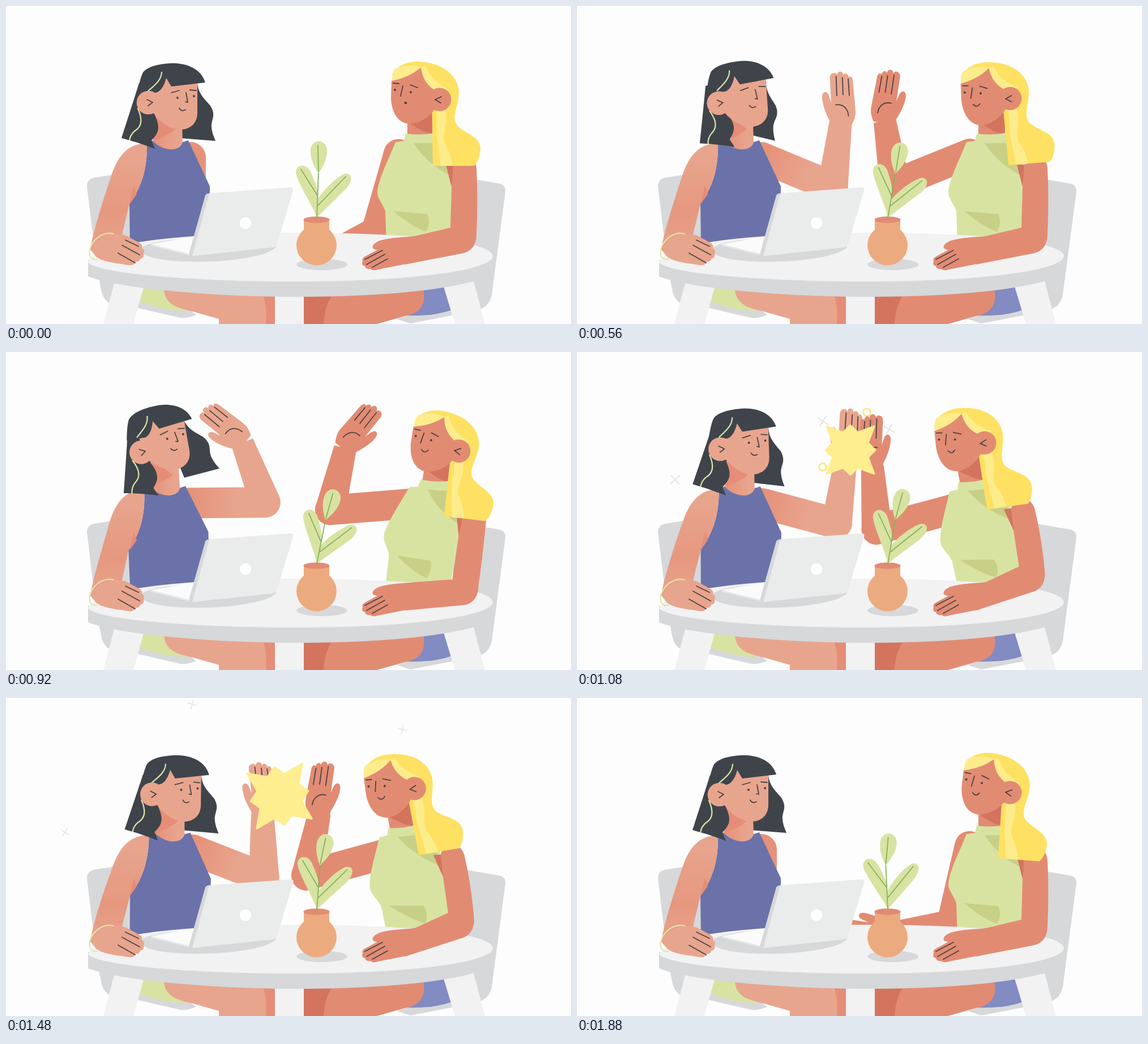
An HTML page that plays this animation: 998x561 px, repeating every 1920 ms.

```html
<!DOCTYPE html>
<html lang="en">
<head>
<meta charset="utf-8">
<title>High five</title>
<style>
html, body { margin: 0; width: 100%; height: 100%; overflow: hidden; background: #fdfdfd; }
svg { display: block; width: 100%; height: 100%; }
.ink { fill: none; stroke: #4a4444; stroke-width: 1.8; stroke-linecap: round; stroke-linejoin: round; }
.dot { fill: #4a4444; }
.grey { fill: #d6d8da; }
.pale { fill: #f2f2f2; }
.lime { fill: #d8e3a2; }
.olive { fill: #c8d088; }
.vein { fill: none; stroke: #85b35c; stroke-width: 1.8; stroke-linecap: round; }
.thread { fill: none; stroke: #dde6a9; stroke-width: 2.2; stroke-linecap: round; }
.skinA { fill: #e8a58e; }
.shadeA { fill: #e58d77; }
.skinB { fill: #e28b73; }
.shadeB { fill: #d4745f; }
.dark { fill: #3f444b; }
.gold { fill: #fee162; }
.light { fill: #fdec8c; }
.blue { fill: #6b72a9; }
</style>
</head>
<body>
<svg viewBox="0 0 998 561" preserveAspectRatio="none">
<defs>
  <linearGradient id="upper"><stop offset=".15" stop-color="#e6917a"/><stop offset=".6" stop-color="#e8a58e"/></linearGradient>
  <linearGradient id="rest" x2="0" y2="1"><stop offset=".1" stop-color="#e8a58e"/><stop offset=".6" stop-color="#e6987f"/><stop offset="1" stop-color="#e8a58e"/></linearGradient>
  <linearGradient id="neck"><stop offset="0" stop-color="#e6917a"/><stop offset=".8" stop-color="#e8a58e"/></linearGradient>
  <g id="palm">
    <path d="M-19,4 L-19,-6 C-26,-22 -30,-38 -29,-49 C-28,-60 -19,-59 -17,-50 L-14,-38 L-13,-81 C-13,-91 -1,-92 0,-85 C0,-93 11,-93 11,-84 C13,-89 20,-87 20,-80 C22,-83 27,-81 27,-73 L28,-20 C28,-8 23,-3 20,4 Z"/>
    <path class="ink" d="M-2,-83 L-3,-49 M9,-80 L8,-50 M19,-77 V-48 M-6,-33 C8,-34 15,-24 15,-12"/>
  </g>
</defs>

<g class="grey">
  <path d="M143,318 Q143,306 155,303 L225,292 L225,532 L200,530 Q172,526 168,500 L160,460 Z"/>
  <path d="M225,500 L225,531 L308,550 Q318,552 336,545 L290,510 Z"/>
  <path d="M795,300 L870,313 Q883,315 882,328 L858,510 Q854,530 835,536 L780,530 Z"/>
  <path d="M690,552 L714,560 L792,545 L780,525 Z"/>
</g>
<g id="bits"></g>

<path class="lime" d="M243,490 L236,521 Q275,537 316,538 L300,495 Z"/>
<path class="shadeA" d="M430,500 H475 V561 H440 Z"/>
<path class="skinA" d="M279,495 C278,528 305,533 330,539 L376,552 V561 H459 C461,535 458,515 449,500 Z"/>
<path class="shadeB" d="M526,500 H600 L580,561 H526 Z"/>
<path d="M730,495 H778 L788,536 Q755,548 705,546 Z" fill="#828bc2"/>
<path class="skinB" d="M580,505 C566,522 562,543 561,561 H655 L705,547 C735,541 742,525 737,495 Z"/>
<g class="pale">
  <path d="M192,485 L245,490 L225,561 H172 Z"/>
  <path d="M475,500 H526 V561 H475 Z"/>
  <path d="M770,485 L826,485 L846,561 H793 Z"/>
</g>

<g id="headBackA"><g id="lockR">
  <path class="dark" d="M300,132 L338,136 C340,155 350,163 361,176 C372,194 362,200 363,214 C364,224 367,230 370,238 L306,233 Z"/>
</g></g>

<g id="armA">
  <rect x="-27" y="-27" width="190" height="54" rx="27" fill="url(#upper)"/>
  <g id="foreA" class="skinA">
    <path d="M0,-27 L113,-20 V20 L0,27 Z"/>
    <g id="handA"><use href="#palm"/></g>
  </g>
</g>
<g id="armB" class="skinB">
  <rect x="-26" y="-26" width="196" height="53" rx="26"/>
  <g id="foreB">
    <path d="M0,-27 L113,-20 V20 L0,27 Z"/>
    <g id="handB"><use href="#palm" transform="scale(-1 1)"/></g>
  </g>
</g>

<g id="bodyA">
  <path class="blue" d="M249,241 L262,236 Q290,262 312,240 L322,237 L360,318 V425 H219 L218,348 C238,322 250,290 249,241 Z"/>
  <path d="M266,205 H311 L312,241 C306,258 278,257 259,238 Z" fill="url(#neck)"/>
  <path class="shadeA" d="M260,186 L300,217 Q290,226 262,238 Z"/>
</g>
<g id="bodyB">
  <path class="skinB" d="M709,195 H756 V232 H709 Z"/>
  <path class="shadeB" d="M712,207 L756,180 V226 L738,222 Z"/>
  <path class="lime" d="M688,240 L703,238 L706,225 Q730,229 757,224 L790,270 L787,330 L785,420 H672 L670,362 C664,345 655,340 656,325 C660,300 677,268 688,240 Z"/>
  <path class="olive" d="M720,242 H757 L786,280 V300 Q745,280 720,242 Z M684,362 L744,367 Q751,382 742,398 C722,392 700,375 684,362 Z"/>
  <path class="shadeB" d="M777,280 H796 L787,319 Z"/>
</g>

<path class="grey" d="M145,448 V477 C210,502 400,514 530,513 C700,512 825,494 853,474 L860,440 Z"/>
<path class="pale" d="M145,452 C165,476 380,487 530,486 C720,485 860,466 860,441 C858,418 740,400 503,400 C380,400 230,410 175,430 Q150,440 145,452 Z"/>

<path class="grey" d="M237,431 C246,451 330,455 400,448 C445,442 470,435 478,424 L300,412 Q240,418 237,431 Z"/>
<path d="M256,420 L340,405 L326,440 Z" fill="#fbfbfb"/>
<path d="M256,420 L324,437 V440 L256,423 Z" fill="#e6e7e8"/>
<path class="grey" d="M352,334 Q354,330 362,330 L340,440 L327,441 Q322,440 324,434 Z"/>
<path d="M358,334 Q359,330 364,330 L503,320 Q509,320 507,326 L479,419 Q477,425 471,426 L329,441 Z" fill="#eaebeb"/>
<circle cx="423" cy="383" r="10.3" fill="#fdfdfd"/>

<path id="restA" fill="url(#rest)"/>
<path class="shadeA" d="M226,317 L231,332 L218,350 Z"/>
<path class="skinA" d="M152,430 C160,410 178,402 192,402 Q208,402 216,407 L236,418 Q242,422 240,427 Q246,431 243,437 Q245,444 237,446 Q236,452 229,451 Q226,459 216,457 C198,454 172,452 160,443 Z"/>
<path class="ink" d="M211,413 L234,424 M205,422 L236,439 M198,436 L228,453"/>
<path class="thread" d="M190,402 C165,395 141,425 149,442 Q153,448 161,447"/>
<path id="restB" class="skinB"/>
<path class="skinB" d="M722,406 C705,408 680,408 660,414 C643,421 645,430 656,430 L634,442 Q628,445 630,450 Q627,458 634,459 Q635,465 644,464 Q648,468 656,465 L712,454 Z"/>
<path class="ink" d="M665,431 L634,447 M669,438 L637,456 M674,446 L647,461"/>

<ellipse class="grey" cx="558" cy="456" rx="45" ry="10"/>
<circle cx="548.5" cy="422" r="35.5" fill="#ecaa7f"/>
<path d="M526,377 H571 V400 H526 Z" fill="#ecaa7f"/>
<ellipse class="skinB" cx="548.5" cy="377" rx="23" ry="5.8"/>
<g id="plant">
  <path class="lime" d="M549,373 C542,352 511,306 512,292 C514,277 533,278 539,295 C546,310 552,322 551,340 Z"/>
  <path class="lime" d="M549,373 L550,342 C560,325 582,303 598,296 C612,294 613,308 601,322 Z"/>
  <path class="vein" d="M521,288 L550,334 M600,301 L551,352 M549,374 L552,293"/>
  <g id="leaf">
    <path class="lime" d="M552,295 C541,280 537,265 538,253 C541,234 564,234 567,253 C568,270 560,283 552,295 Z"/>
    <path class="vein" d="M552,292 L551,246"/>
  </g>
</g>

<g id="headA">
  <g id="lockL">
    <path class="dark" d="M244,136 L235,136 C226,165 214,202 204,233 Q235,241 263,252 L257,237 C270,224 273,214 263,193 L262,140 Z"/>
    <path class="thread" d="M233,181 C243,203 238,214 228,220 Q220,226 218,237"/>
  </g>
  <path class="skinA" d="M283,120 H338 V190 C337,210 322,218 308,218 C288,217 270,203 260,188 L254,150 Z"/>
  <path class="dark" d="M352,135 L292,142 L283,127 C279,144 270,154 262,153 L232,153 C235,137 238,125 242,117 C252,104 280,101 298,101 C325,102 346,114 352,135 Z"/>
  <path class="thread" d="M275,117 C274,132 262,140 251,150"/>
  <g id="earA">
    <circle class="skinA" cx="251.500" cy="170.500" r="20.800"/>
    <path class="ink" d="M249,165 L259,170 L251,176"/>
  </g>
  <path class="ink" d="M292,153 L306,149 M325,148 L336,149 M318,153 L321,170 L317,169 M306,180 Q310,187 317,183"/>
  <g id="eyesA" class="dot"><circle cx="303" cy="162" r="2"/><circle cx="332" cy="159" r="2"/></g>
</g>

<g id="headB">
  <path class="gold" d="M682,132 C682,106 708,98 726,98 C770,99 797,121 800,150 C801,175 785,195 797,211 C812,226 838,230 838,252 Q837,272 827,282 H754 L752,150 Z"/>
  <path class="light" d="M760,180 L776,184 C782,205 770,222 774,240 Q787,262 789,282 H767 C766,255 758,228 762,205 Z"/>
  <path class="skinB" d="M681,132 L733,109 C740,135 752,148 762,150 L756,184 C745,198 728,208 712,208 C688,206 680,180 680,160 Z"/>
  <path class="light" d="M682,132 Q681,118 687,111 Q710,101 733,108 Q715,125 682,132 Z M733,108 L741,106 C748,128 768,140 782,147 L762,150 C745,143 735,128 733,108 Z"/>
  <circle class="skinB" cx="766" cy="165" r="20.500"/>
  <path class="ink" d="M769,160 L758,165 L768,171 M684,136 L694,137 M714,139 L727,144 M701,141 L697,159"/>
  <g id="eyesB" class="dot"><circle cx="687" cy="148" r="2"/><circle cx="715" cy="152" r="2"/></g>
  <circle id="gasp" class="dot" cx="706" cy="171" r="2.300"/>
  <path id="smile" class="ink" d="M700,170 Q706,178 712,170"/>
</g>
<path id="star" fill="#feee90" stroke="#feee90" stroke-width="5" stroke-linejoin="round"/>
</svg>

<script>
const LOOP = 1920, STEP = 40;
const keys = [0, 280, 560, 920, 1080, 1280, 1640, 1880];
// One value per key time; angles in degrees.
const pose = {
  upperA: [90, 29, 22.5, -0.5, 15, 17, 28, 90],
  foreA:  [35, -80, -83, -111, -82, -87, -93, 35],
  handA:  [100, 0, -4, -52, 2, -8, -8, 100],
  leanA:  [0, 0, 0, -1.7, 0.6, 0.4, 1.8, 0],
  xA:     [251, 251, 249, 235, 252, 253, 260, 251],
  yA:     [170, 170, 169, 170, 170, 170, 169, 170],
  tiltA:  [0, 0, -4, -10, -2, 0, 1, 0],
  earA:   [0, 0, 2, 7, 1, 0, 0, 0],
  lockL:  [0, 0, -8, -4, 3, 0, 0, 0],
  lockR:  [0, 0, 13, -9, 4, 0, 0, 0],
  upperB: [106, 150, 158, 175.5, 165, 167, 160, 103],
  foreB:  [155, 259, 261, 283.5, 266, 272, 286, 172],
  handB:  [-110, 4, 10, 40, 4, 8, 10, -80],
  leanB:  [0, 0, 0, 8.5, -10.5, -11, -8.2, 0],
  xB:     [768, 768, 767, 802, 722, 719, 731, 767],
  yB:     [165, 165, 163, 175, 160, 159, 160, 167],
  tiltB:  [0, 0, -4.5, 7, -8, -11, -7, 4.5],
  sway:   [0, 5, 7.6, 9, 7.5, 5, -0.5, -4.7],
  leaf:   [0, 1, 3, 8, 9, 10, 11, 11]
};
const starSize = [[1020, 0], [1120, 1.12], [1280, 1], [1480, 0.85], [1640, 0.42], [1720, 0]];
const BURST = { x: 483, y: 173, start: 1000, span: 700, end: 1660 };
// Kind, travel, sharpness and turn of each flying bit.
const bits = [
  ["cross", -159, -167, 3, 25], ["cross", 224, -121, 3, 20], ["cross", -379, 64, 14, 40],
  ["ring", 95, -219, 3, 0], ["ring", -160, 98, 3, 0]
];

const $ = id => document.getElementById(id);
const move = (id, value) => $(id).setAttribute("transform", value);
const rad = deg => deg * Math.PI / 180;

// Monotone cubic through the keys, flat at each turning point.
function sample(xs, ys, t) {
  const n = xs.length;
  if (t <= xs[0]) return ys[0];
  if (t >= xs[n - 1]) return ys[n - 1];
  const slope = k => (ys[k + 1] - ys[k]) / (xs[k + 1] - xs[k]);
  const tangent = k => {
    if (k === 0 || k === n - 1) return 0;
    const a = slope(k - 1), b = slope(k);
    return a * b <= 0 ? 0 : 2 * a * b / (a + b);
  };
  let i = 0;
  while (t >= xs[i + 1]) i++;
  const w = xs[i + 1] - xs[i], u = (t - xs[i]) / w, v = 1 - u;
  return ys[i] * v * v * (1 + 2 * u) + ys[i + 1] * u * u * (3 - 2 * u) +
    w * u * v * (tangent(i) * v - tangent(i + 1) * u);
}

function leaner(px, lean) {
  const py = 405, a = rad(lean / 2);
  return {
    css: `translate(${px} ${py}) rotate(${lean / 2}) skewX(${-lean / 2}) translate(${-px} ${-py})`,
    pt(x, y) {
      const dy = y - py, dx = x - px - Math.tan(a) * dy;
      return [px + dx * Math.cos(a) - dy * Math.sin(a), py + dx * Math.sin(a) + dy * Math.cos(a)];
    }
  };
}

function setArm(s, [x, y], len, upper, fore, hand) {
  move("arm" + s, `translate(${x} ${y}) rotate(${upper})`);
  move("fore" + s, `translate(${len} 0) rotate(${fore - upper})`);
  move("hand" + s, `translate(113 0) rotate(${hand - fore})`);
}

function blink(id, cy, closed) {
  move(id, `translate(0 ${cy}) scale(1 ${closed ? 0 : 1}) translate(0 ${-cy})`);
}

function starPath() {
  let d = "";
  for (let i = 0; i < 16; i++) {
    const r = i % 2 ? 46 : i % 4 ? 81 : 60, a = i * Math.PI / 8;
    d += (i ? "L" : "M") + r * Math.cos(a) + "," + r * Math.sin(a);
  }
  return d + "Z";
}

function draw(t) {
  const p = {};
  for (const k in pose) p[k] = sample(keys, pose[k], t);
  const A = leaner(285, p.leanA), B = leaner(730, p.leanB);
  move("bodyA", A.css);
  move("bodyB", B.css);
  setArm("A", A.pt(326, 267), 136, p.upperA, p.foreA, p.handA);
  const [sx, sy] = B.pt(694, 261);
  setArm("B", [sx, sy + Math.abs(p.leanB)], 143, p.upperB, p.foreB, p.handB);

  $("restA").setAttribute("d", `M${A.pt(249, 242)} C${A.pt(216, 243)} ${A.pt(198, 262)} ${A.pt(185, 302)}
    C170,347 152,405 149,430 L160,443 L205,403 L${A.pt(218, 349)} C${A.pt(238, 322)} ${A.pt(250, 290)} ${A.pt(249, 242)} Z`);
  // The elbow sinks and rises as the body leans.
  const elbow = (x, y) => [x + 0.4 * p.leanB, y + 1.2 * p.leanB];
  $("restB").setAttribute("d", `M${B.pt(790, 280)} L${B.pt(800, 255)} Q${B.pt(828, 262)} ${B.pt(831, 285)}
    Q${B.pt(834, 340)} ${elbow(831, 404)} Q${elbow(830, 430)} ${elbow(808, 436)}
    L705,456 L695,412 L722,406 L${elbow(785, 391)} L${B.pt(787, 320)} Z`);

  const headA = `translate(${p.xA} ${p.yA}) rotate(${p.tiltA}) translate(-251 -170)`;
  move("headA", headA);
  move("headBackA", headA);
  const drop = `translate(${p.earA * 0.3} ${p.earA})`;
  move("earA", drop);
  move("lockL", `${drop} rotate(${p.lockL} 251 170)`);
  move("lockR", `rotate(${p.lockR} 325 140)`);
  move("headB", `translate(${p.xB} ${p.yB}) rotate(${p.tiltB}) translate(-768 -165)`);
  const late = t >= 1600 && t < 1720;
  blink("eyesA", 161, late || (t >= 520 && t < 640));
  blink("eyesB", 150, late);
  const smiling = t >= 440;
  $("gasp").style.display = smiling ? "none" : "";
  $("smile").style.display = smiling ? "" : "none";

  move("plant", `rotate(${p.sway} 549 374)`);
  move("leaf", `rotate(${p.leaf} 552 294)`);

  const size = sample(starSize.map(k => k[0]), starSize.map(k => k[1]), t);
  const spin = -18 * Math.max(0, Math.min(1, (t - 1280) / 360));
  $("star").style.display = size > 0.01 ? "" : "none";
  move("star", `translate(${BURST.x} ${BURST.y}) rotate(${spin}) scale(${size})`);

  const u = (t - BURST.start) / BURST.span;
  $("bits").style.display = u > 0 && t < BURST.end ? "" : "none";
  bits.forEach(([, dx, dy, power, turn], i) => {
    const go = 1 - (1 - Math.min(1, Math.max(0, u))) ** power;
    $("bits").children[i].setAttribute("transform",
      `translate(${BURST.x + dx * go} ${BURST.y + dy * go}) rotate(${turn - 30 * (u - 0.4)}) scale(${1.15 - 0.4 * u})`);
  });
}

$("star").setAttribute("d", starPath());
$("bits").innerHTML = bits.map(([kind]) => kind === "cross"
  ? '<path d="M-10,0 H10 M0,-10 V10" stroke="#e2e2e3" stroke-width="1.6"/>'
  : '<circle r="6" fill="none" stroke="#fde37a" stroke-width="2.2"/>').join("");

const begin = performance.now();
function tick() {
  const t = (performance.now() - begin) % LOOP;
  draw(Math.floor(t / STEP) * STEP);
  requestAnimationFrame(tick);
}
draw(0);
requestAnimationFrame(tick);
</script>
</body>
</html>
```
